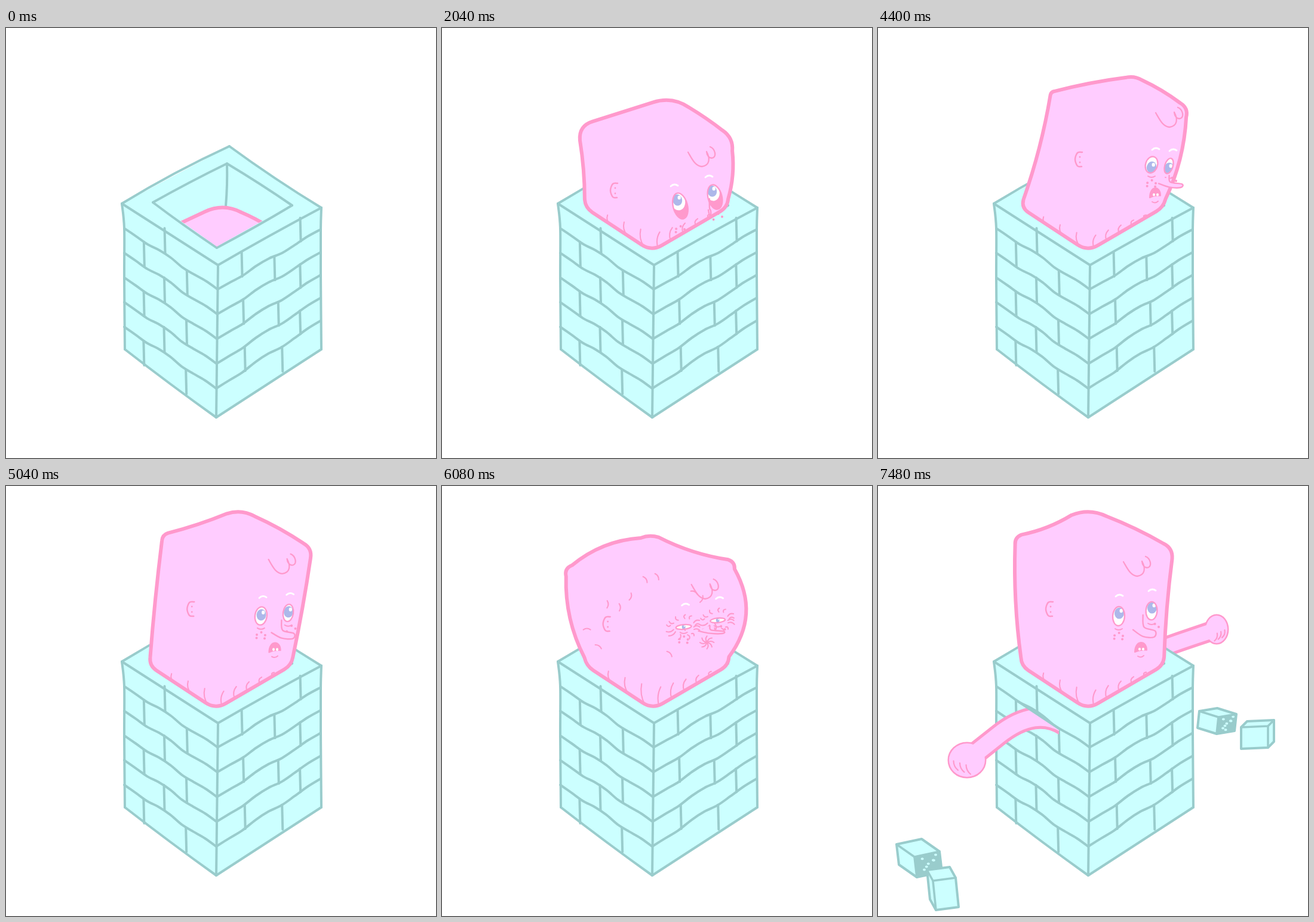
An HTML page with a canvas for the animation above (8160 ms loop, 720 by 720 pixels).

```html
<!DOCTYPE html>
<html lang="en">
<head>
<meta charset="utf-8">
<title>Head in a well</title>
<style>
html, body { margin: 0; width: 100%; height: 100%; overflow: hidden; background: #fff; }
canvas { display: block; width: 100vw; height: 100vh; }
</style>
</head>
<body>
<canvas id="stage" width="720" height="720"></canvas>
<script>
const c = document.getElementById('stage').getContext('2d');
const LOOP = 8160, STEP = 40, BURST = 6560;
const ICE = '#ccffff', TEAL = '#99cccc', PINK = '#ffccff', ROSE = '#ff99cc', BLUE = '#adb8ea';
c.lineCap = c.lineJoin = 'round';

const clamp = x => Math.max(0, Math.min(1, x));
const smooth = k => k * k * (3 - 2 * k);
const out = k => 1 - (1 - k) ** 2;
const back = k => 1 + 2.2 * (k - 1) ** 3 + 1.2 * (k - 1) ** 2;
const mix = (a, b, k) => a.map((v, i) => v + (b[i] - v) * k);
const add = (...list) => list.reduce(([x, y], [u, v]) => [x + u, y + v]);
const noise = n => { const v = Math.sin(n * 127.1) * 43758.5; return v - Math.floor(v); };

function fill(path, color) { c.fillStyle = color; c.fill(path); }
function stroke(path, color, w) { c.strokeStyle = color; c.lineWidth = w; c.stroke(path); }
function poly(points, closed = true) {
  const path = new Path2D();
  points.forEach(p => path.lineTo(...p));
  if (closed) path.closePath();
  return path;
}
function oval(x, y, rx, ry, tilt = 0) {
  const path = new Path2D();
  path.ellipse(x, y, Math.max(rx, .1), Math.max(ry, .1), tilt, 0, 7);
  return path;
}
// smooth line through points
function curve(p) {
  const path = new Path2D(), at = i => p[Math.max(0, Math.min(p.length - 1, i))];
  path.moveTo(...p[0]);
  for (let i = 0; i < p.length - 1; i++) {
    const [a, b, d, e] = [at(i - 1), at(i), at(i + 1), at(i + 2)];
    path.bezierCurveTo(b[0] + (d[0] - a[0]) / 6, b[1] + (d[1] - a[1]) / 6,
      d[0] - (e[0] - b[0]) / 6, d[1] - (e[1] - b[1]) / 6, ...d);
  }
  return path;
}
// control point of an edge that bulges outwards (edges run clockwise)
function bow(a, b, size) {
  const dx = b[0] - a[0], dy = b[1] - a[1], n = 2 * size / Math.hypot(dx, dy);
  return [(a[0] + b[0]) / 2 + dy * n, (a[1] + b[1]) / 2 - dx * n];
}
function arc(a, b, size = 0) {
  const path = new Path2D();
  path.moveTo(...a);
  path.quadraticCurveTo(...bow(a, b, size), ...b);
  return path;
}

// ---- well ----
const BACK = [374, 198], LEFT = [194, 294], RIGHT = [528, 301], FRONT = [355, 397];
const FOOT = [[199, 538], [352, 652], [528, 538]];
const IN = [[370, 227], [479, 297], [353, 368], [246, 292]];
const leftEdge = k => [198, 294 + 41.3 * k];
const frontEdge = k => [355 - .6 * k, 396 + 41.5 * k];
const rightEdge = k => [527, 299 + 38.2 * k];
// point on a wobbly row of mortar
const row = (a, b, k, u) => add(mix(a(k), b(k), u), [0, 2.6 * Math.sin(Math.PI * u) * Math.cos(13.4 * (u - .2))]);

const shell = poly([BACK, RIGHT, rightEdge(1), FOOT[2], FOOT[1], FOOT[0], leftEdge(1), LEFT]);
const joints = [
  arc(LEFT, BACK, 3), arc(BACK, RIGHT, -2), arc(LEFT, FRONT), arc(FRONT, RIGHT, 1),
  ...IN.map((p, i) => arc(p, IN[(i + 1) % 4], 1)), arc(IN[0], [368, 298], 1),
  curve([LEFT, leftEdge(1), leftEdge(3), FOOT[0]]), arc(FRONT, FOOT[1]),
  curve([RIGHT, rightEdge(1), rightEdge(3), FOOT[2]]), arc(FOOT[0], FOOT[1], -1), arc(FOOT[1], FOOT[2])
];
for (let k = 0; k < 6; k++) {
  const sides = [
    [leftEdge, frontEdge, k % 2 ? [.21, .67] : [.43]],
    [frontEdge, rightEdge, k % 2 ? [.53 + .02 * k] : [.23 + .01 * k, .8]]
  ];
  for (const [a, b, cuts] of sides) {
    if (k) joints.push(curve(Array.from({ length: 9 }, (_, i) => row(a, b, k, i / 8))));
    for (const u of cuts) {
      const top = row(a, b, k, u), end = k < 5 ? row(a, b, k + 1, u) : add(top, [0, 41]);
      joints.push(arc(top, [top[0] + 1, end[1]]));
    }
  }
}
function drawWell() {
  fill(shell, ICE);
  joints.forEach(p => stroke(p, TEAL, 4));
}

// ---- head poses ----
// tl, top, tr: upper corners with rounding; bulge: left, top left, top right, right
// eye: x, y, radii; gap: offset of far eye; nose, mouth: x, y, width, height; ear: x, y, facing
// look: tilt, red lid, neck folds, wrinkles
const peek = {
  tl: [229, 164, 24], top: [386, 114, 34], tr: [488, 184, 22], bulge: [-2, 0, 1, 4],
  hair: [412, 208], eye: [399, 298, 12, 22], gap: [58, -15], gaze: [-5, -10], brow: [-10, -35],
  nose: [446, 314, 4, 28], mouth: [420, 330, 0, 0], ear: [288, 272, 1], look: [-.25, 1, 1, 0]
};
const left = {
  tl: [229, 115, 12], top: [272, 70, 14], tr: [456, 70, 20], bulge: [-1, 0, 4, 3],
  hair: [272, 166], eye: [291, 234, 9, 11], gap: [58, -1], gaze: [-2, 2], brow: [-7, -24],
  nose: [328, 280, -30, 48], mouth: [346, 297, 12, 8], ear: [463, 209, -1], look: [.1, 0, .6, .1]
};
const right = {
  tl: [290, 107, 5], top: [430, 80, 14], tr: [520, 134, 16], bulge: [-4, 2, 2, 7],
  hair: [465, 142], eye: [458, 229, 10, 14], gap: [29, 2], gaze: [0, 4], brow: [7, -27],
  nose: [470, 267, 39, 20], mouth: [464, 276, 9, 8], ear: [336, 220, 1], look: [.3, 0, .8, 0]
};
const bulged = {
  tl: [224, 84, 14], top: [367, 36, 14], tr: [492, 88, 18], bulge: [19, -9, -14, 13],
  hair: [407, 140], eye: [406, 207, 9, 11], gap: [53, -4], gaze: [1, -4], brow: [1, -46],
  nose: [436, 237, 39, 21], mouth: [440, 263, 15, 12], ear: [286, 197, 1], look: [.1, 0, 1.3, .4]
};
const strained = {
  tl: [203, 138, 14], top: [346, 81, 16], tr: [489, 127, 12], bulge: [9, 10, -5, 24],
  hair: [416, 165], eye: [403, 236, 13, 4], gap: [57, -11], gaze: [0, 0], brow: [3, -38],
  nose: [428, 247, 42, 13], mouth: [442, 262, 8, 0], ear: [274, 231, 1], look: [-.1, 0, 1.2, 1]
};
const calm = {
  tl: [229, 86, 12], top: [354, 37, 32], tr: [494, 104, 18], bulge: [4, -4, 2, -2],
  hair: [411, 127], eye: [403, 218, 10, 16], gap: [55, -9], gaze: [1, -5], brow: [1, -35],
  nose: [427, 253, 37, 37], mouth: [440, 270, 10, 8], ear: [287, 206, 1], look: [.05, 0, 1, 0]
};
const PLACES = ['tl', 'top', 'tr', 'hair', 'eye', 'nose', 'mouth', 'ear'];
function change(pose, move) {
  const p = { ...pose };
  for (const key of PLACES) p[key] = [...move(p[key][0], p[key][1]), ...p[key].slice(2)];
  return p;
}
const warp = (pose, tall, lean = 0) =>
  change(pose, (x, y) => [x + (300 - y) * lean, 300 - (300 - y) * tall]);
const low = {
  ...change(peek, (x, y) => [x, y + 230]),
  tl: [266, 339, 20], top: [364, 293, 34], tr: [456, 341, 20], look: [-.25, 1, 0, 0]
};
const leaning = warp(right, 1.03, .16), tall = warp(calm, 1.07);

const keys = [
  [0, low], [1320, low], [2040, peek], [2760, peek], [2960, warp(left, 1.07)], [3080, left],
  [3400, left], [3560, warp(left, 1.035)], [4040, right], [4400, right], [4720, leaning],
  [4880, leaning], [5280, tall, out], [5520, tall], [5640, bulged], [5880, strained, out],
  [7280, strained], [7400, warp(calm, 1.012), out], [7480, calm], [LOOP, calm]
];
function headAt(t) {
  const i = keys.findIndex(k => k[0] > t), [t0, a] = keys[i - 1], [t1, b, ease = smooth] = keys[i];
  const k = ease((t - t0) / (t1 - t0)), p = {};
  for (const key in a) p[key] = mix(a[key], b[key], k);
  return p;
}

// ---- face parts ----
const CHIN = [351, 374], JAW_L = [240, 301], JAW_R = [478, 300];
function outline({ tl, top, tr, bulge }) {
  const path = new Path2D();
  const corners = [[...JAW_L, 14], tl, top, tr, [...JAW_R, 14], [...CHIN, 20]];
  const toward = (a, b) => mix(a, b, Math.min(.45, a[2] / Math.hypot(b[0] - a[0], b[1] - a[1]))).slice(0, 2);
  corners.forEach((p, i) => {
    const prev = corners[(i + 5) % 6], next = corners[(i + 1) % 6];
    const from = toward(p, next), to = toward(next, p);
    if (i) path.quadraticCurveTo(p[0], p[1], ...from);
    else path.moveTo(...from);
    path.quadraticCurveTo(...bow(from, to, bulge[i] || 0), ...to);
  });
  path.quadraticCurveTo(...JAW_L, ...toward(corners[0], tl));
  path.closePath();
  return path;
}
function drawEye([x, y, rx, ry], [gx, gy], [tilt, lid]) {
  const shape = oval(x, y, rx, ry, tilt), iris = Math.min(8, ry * .75);
  fill(shape, ROSE);
  c.save();
  c.clip(shape);
  fill(oval(x - 4 * lid, y - 8 * lid, rx, ry * (1 - .3 * lid), tilt), '#fff');
  fill(oval(x + gx, y + gy, iris, iris * 1.2, tilt), BLUE);
  fill(oval(x + gx + iris * .4, y + gy - iris / 2, iris / 3, iris * .4), '#fff');
  c.restore();
  stroke(shape, ROSE, 2.3);
}
function drawMouth([x, y, rx, ry]) {
  if (rx < 1 || ry < 1) return;
  const m = new Path2D(`M${x - rx} ${y + ry}C${x - rx} ${y - ry * 1.6} ${x + rx} ${y - ry * 1.6} ${x + rx} ${y + ry * .6}Q${x} ${y + ry * .4} ${x - rx} ${y + ry}Z`);
  fill(m, ROSE);
  stroke(m, ROSE, 2);
  for (const d of [-2, 4]) fill(oval(x + d, y + ry * .4, 2, 2.4), '#fff');
  stroke(arc([x - 5, y + ry + 7], [x + 5, y + ry + 6], -2), ROSE, 2);
}
function drawEar([x, y, m]) {
  const ear = curve([[x + 6 * m, y - 12], [x - 2 * m, y - 11], [x - 6 * m, y], [x - 2 * m, y + 11], [x + 5 * m, y + 12]]);
  fill(ear, PINK);
  stroke(ear, ROSE, 2.5);
  for (const d of [-4, 5]) fill(oval(x + 2 * m, y + d, 1.4, 1.4), ROSE);
}
function drawNose([x, y, w, h]) {
  const shape = [[.45, -1], [.5, -.45], [1, -.28], [.95, 0], [.45, -.03], [0, -.33]];
  const nose = curve(shape.map(([u, v]) => [x + u * w, y + v * h]));
  fill(nose, PINK);
  stroke(nose, ROSE, 2.4);
}
function drawHair([x, y]) {
  stroke(new Path2D(`M${x} ${y}c7 12 12 23 23 24c14-2 14-14 8-25c1 14 16 14 14 2q-2-8-8-10`), ROSE, 2.3);
}
function drawFreckles(x, y, count) {
  for (let i = 0; i < count; i++) {
    const r = i % 2 ? 10 : 7, a = i * 2.4;
    fill(oval(x + r * Math.cos(a), y + r * .7 * Math.sin(a), 2, 2), ROSE);
  }
}
function drawFolds(size) {
  for (let i = 0; i < 8; i++) {
    const [x, y] = i < 3 ? mix(JAW_L, CHIN, .38 + i * .25) : mix(CHIN, JAW_R, (i - 2.5) / 6);
    const len = size * 30 * (1 - Math.abs(x - 345) / 130);
    if (len > 2) stroke(arc([x, y], [x + (x < 345 ? -5 : 3), y - len], 3), ROSE, 2.1);
  }
}
function drawWrinkles(eyes, mouth, w) {
  if (w < .3) return;
  const ray = (x, y, a, r0, r1, flat) => stroke(arc(
    [x + r0 * Math.cos(a), y + r0 * flat * Math.sin(a)],
    [x + r1 * Math.cos(a), y + r1 * flat * Math.sin(a)], 2), ROSE, 2.1);
  for (const [x, y] of eyes)
    for (let i = 0; i < 14 * w; i++) ray(x, y, i * 2.4, 17 + 6 * noise(i), 25 + 9 * noise(i + 9), .65);
  for (let i = 0; i < 8; i++) ray(mouth[0], mouth[1], i * Math.PI / 4, mouth[2] * (w > .7 ? .1 : 1.4), mouth[2] * 1.1 + 3, .9);
  for (let i = 0; i < 12; i++) {
    const x = 235 + 20 * i, y = 110 + 170 * noise(i + 3), a = noise(i) * 2;
    stroke(arc([x, y], [x + 12 * Math.cos(a), y + 12 * Math.sin(a)], 2), ROSE, 2.1);
  }
}
function drawHead(t) {
  const p = headAt(t), { eye, gap, brow } = p, [, lid, folds, wrinkles] = p.look;
  const open = t > 2240 && t < 2480 ? 1 - .92 * Math.sin((t - 2240) / 240 * Math.PI) : 1;
  const [x, y, rx, ry] = eye;
  const eyes = [[x, y, rx, ry * open], [x + gap[0], y + gap[1], rx * Math.sqrt(gap[0] / 62), ry * open * .95]];
  const body = outline(p);
  c.save();
  if (t < 2040) {
    const d = 9 * clamp((t - 1320) / 720) ** 2 - 2;
    c.clip(poly([[0, 0], [720, 0], [720, 297 + d], ...IN.slice(1).map(q => add(q, [0, d])), [0, 292 + d]]));
  }
  if (t > 5880 && t < 6640) c.translate(1.8 * Math.sin((t - BURST) / STEP * 2), 0);
  // far ear, hidden unless the face looks left
  const far = oval(223 + 40 * (1 + p.ear[2]), 206, 6, 15);
  if (p.ear[2] < 0) { fill(far, PINK); stroke(far, ROSE, 3); }
  fill(body, PINK);
  c.save();
  c.clip(body);
  drawFolds(folds);
  drawWrinkles(eyes, p.mouth, wrinkles);
  c.restore();
  stroke(body, ROSE, 6);
  drawHair(p.hair);
  drawEar(p.ear);
  drawFreckles(x, y + ry + 17, 5);
  drawFreckles(x + gap[0] + 5, y + gap[1] + ry + 11, 3);
  for (const e of eyes) {
    const [bx, by] = add(e, brow);
    stroke(arc([bx - 6, by + 2], [bx + 6, by + 1], 2.5), '#fff', 2.8);
    if (lid < .5) stroke(arc([e[0] - 6, e[1] + ry + 5], [e[0] + 6, e[1] + ry + 5], -2), ROSE, 2);
    drawEye(e, p.gaze, p.look);
  }
  drawNose(p.nose);
  drawMouth(p.mouth);
  c.restore();
}

// ---- arms ----
function drawArm(t, from, bend, fist, rx, ry, width) {
  if (t <= BURST) return;
  const s = back(clamp((t - BURST) / 240)), [x, y] = mix(bend, fist, s);
  const limb = new Path2D(), hand = oval(x, y, rx, ry);
  limb.moveTo(...from);
  limb.quadraticCurveTo(...bend, ...mix(bend, [x, y], .55));
  limb.lineTo(x, y);
  stroke(limb, ROSE, width + 5);
  stroke(hand, ROSE, 5);
  stroke(limb, PINK, width - 5);
  fill(hand, PINK);
  const side = Math.sign(x - bend[0]);
  for (let i = 0; i < 3; i++) {
    const a = [x + side * rx * (.75 - i * .35), y + ry * (.05 + i * .12)];
    stroke(arc(a, add(a, [-side * rx * .25, ry * .55]), 2 * side), ROSE, 2.2);
  }
}
function drawLeftArm(t) {
  const a = row(leftEdge, frontEdge, 1, .21), b = row(leftEdge, frontEdge, 1, .67);
  c.save();
  c.clip(poly([[0, 0], [a[0], 0], a, b, [b[0], 720], [0, 720]]));
  drawArm(t, [316, 402], [265, 367], [149, 459], 30, 28, 33);
  c.restore();
  if (t > BURST) stroke(arc(a, b), TEAL, 4);
}

// ---- bricks ----
// box seen from its nearest top corner p, spanned by a, b and the height h
function drawBox(p, a, b, h, broken) {
  const hull = poly([add(p, a), add(p, a, b), add(p, b), add(p, b, h), add(p, h), add(p, a, h)]);
  fill(hull, ICE);
  if (broken) {
    fill(poly([p, add(p, b), add(p, b, h), add(p, h)]), TEAL);
    for (let i = 0; i < 8; i++) {
      const u = .1 + .8 * noise(i + 1), v = .1 + .8 * noise(i + 20);
      fill(oval(...add(p, b.map(n => n * u), h.map(n => n * v)), 2.4, 2), ICE);
    }
  }
  stroke(poly([add(p, a), p, add(p, b)], false), TEAL, 3.6);
  stroke(poly([p, add(p, h)], false), TEAL, 3.6);
  stroke(hull, TEAL, 4);
}
// half brick thrown from the wall to its resting place
function drawBit(t, from, spin, ...box) {
  if (t <= BURST) return;
  const u = clamp((t - BURST) / 360), r = 1 - u, [x, y] = box[0];
  c.save();
  c.translate(x + (from[0] - x) * r, y + (from[1] - y) * (1 - u * u) - 100 * u * r);
  c.rotate(spin * r);
  c.translate(-x, -y);
  drawBox(...box);
  c.restore();
}
function drawLoose(t) {
  if (t < 6400 || t > BURST) return;
  const k = (t - 6360) / 200, p = [305 - 17 * k, 408 + 13 * k];
  drawBox(p, [-75, -47], [17 * k, -13 * k], [0, 38]);
  c.setLineDash([9, 5]);
  stroke(curve([[265, 382], add(p, [-40, -28]), add(p, [-47, -19]), add(p, [-48, 8])]), TEAL, 3);
  c.setLineDash([]);
}

function frame(now) {
  const t = Math.floor(now % LOOP / STEP) * STEP;
  c.fillStyle = '#fff';
  c.fillRect(0, 0, 720, 720);
  drawArm(t, [440, 285], [480, 269], [567, 240], 18, 23, 29);
  drawBit(t, [490, 270], -1.3, [570, 387], [-32, -10], [30, -5], [-3, 28], true);
  drawBit(t, [520, 255], 2, [653, 402], [-45, 2], [10, -10], [0, 36]);
  drawWell();
  drawHead(t);
  drawLeftArm(t);
  drawLoose(t);
  drawBit(t, [225, 405], 1.2, [61, 621], [-30, -21], [42, -9], [4, 34], true);
  drawBit(t, [265, 425], -1.8, [92, 661], [-10, -18], [38, -5], [5, 49]);
}
const start = performance.now();
function tick() {
  frame(performance.now() - start);
  requestAnimationFrame(tick);
}
tick();
</script>
</body>
</html>
```
